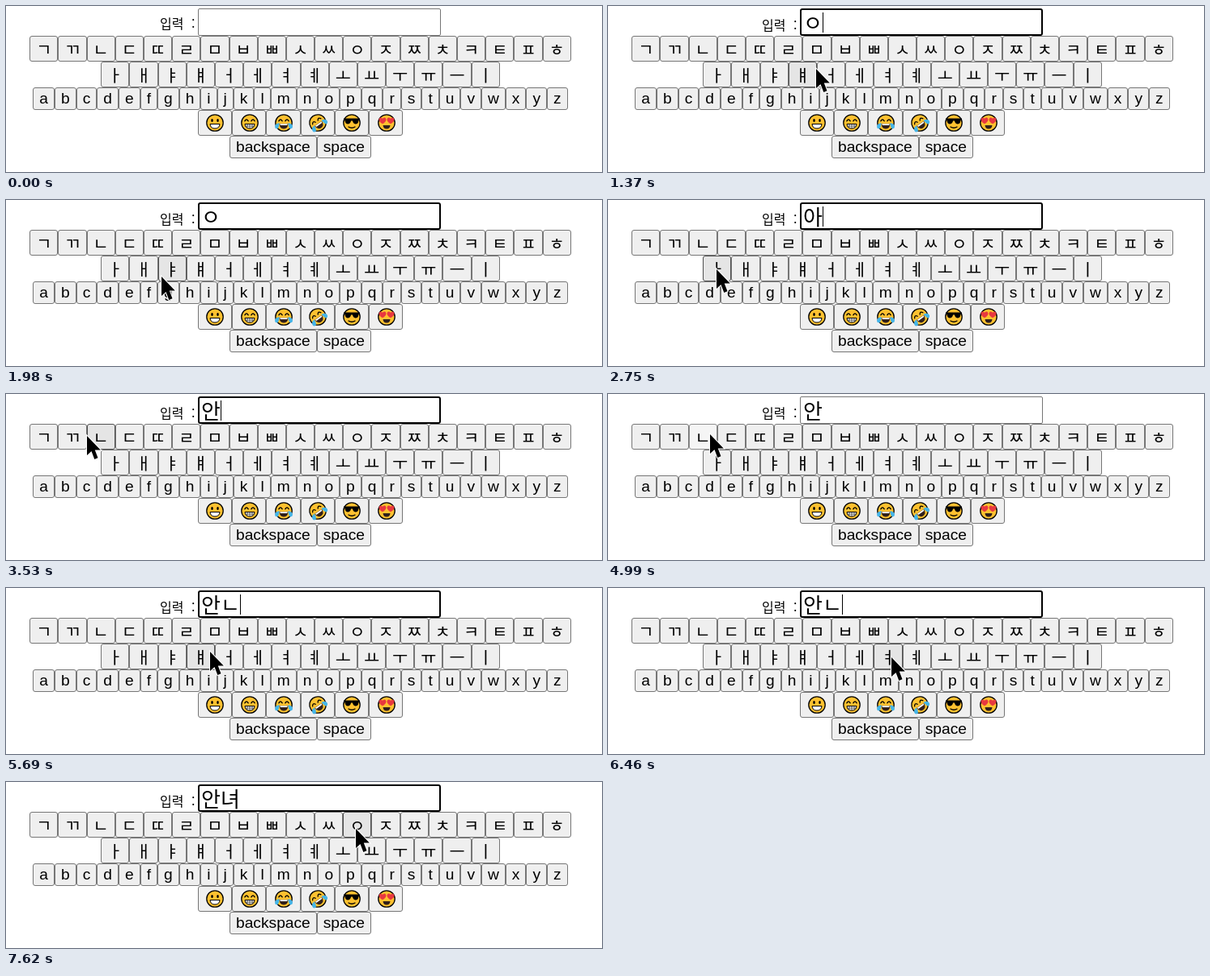
These frames come from a looping animation (736 px wide and 206 px high, 8000 ms). An HTML page:

```html
<!DOCTYPE html>
<html lang="ko">
<head>
<meta charset="utf-8">
<style>
  html, body { margin: 0; width: 736px; height: 206px; overflow: hidden; background: #fff; }
  body { position: relative; color: #000; font-family: "Noto Sans CJK KR", "Noto Sans CJK", sans-serif; font-weight: 300; }
  body > * { position: absolute; box-sizing: border-box; white-space: pre; }
  .row { left: 0; width: 727px; display: flex; justify-content: center; }
  .key {
    box-sizing: border-box; flex: none; height: 32px; padding: 0 7px; text-align: center;
    border: 1px solid #767676; border-radius: 3px; background: #efefef;
    font-size: 20.8px; line-height: 30px;
  }
  .jamo .key { width: 35.2px; padding: 0; }
  .latin .key { height: 28px; font: 19.2px/26px "Liberation Sans", Arial, sans-serif; }
  .emoji .key { width: 42.33px; padding: 3px 0 0 1px; line-height: 0; }
  .key.hover { background: #e5e5e5; border-color: #4f4f4f; }
  .key.active { background: #f5f5f5; border-color: #8d8d8d; }
  #label { left: 190px; font-size: 16px; line-height: 24px; word-spacing: 5px; }
  #field {
    left: 237px; top: 3px; width: 300px; height: 34px; border: 1px solid #767676; border-radius: 2px;
    font-size: 26px; line-height: 32px; padding-left: 3px;
  }
  #field.focus { border: 2px solid #000; border-radius: 3px; line-height: 30px; padding-left: 2px; }
  #caret { top: 8px; width: 1px; height: 25px; background: #000; }
  #cursor { left: 0; top: 0; overflow: visible; }
</style>
</head>
<body>
<div id="label">입력 :</div>
<div id="field"></div>
<div id="caret"></div>
<svg id="cursor" width="20" height="32">
  <path d="M0 0V24L5.5 19L9.3 29L13.5 27.2L9.8 17.5H16.8Z" stroke="#fff" stroke-width="2" paint-order="stroke"/>
</svg>
<script>
const $ = id => document.getElementById(id);
const label = $('label'), field = $('field'), caret = $('caret'), cursor = $('cursor');

const line = (d, width = 1.3) => `<path d="${d}" fill="none" stroke="#000" stroke-width="${width}" stroke-linecap="round"/>`;
const shape = (d, fill) => `<path d="${d}" fill="${fill}"/>`;
const arcEyes = line('M-6.2-2.2Q-4-6-1.8-2.2M1.8-2.2Q4-6 6.2-2.2');
const dotEyes = '<ellipse cx="-3.5" cy="-3" rx="1.3" ry="1.9"/><ellipse cx="3.5" cy="-3" rx="1.3" ry="1.9"/>';
const grin = '<path d="M-6 1.5H6Q5.5 7 0 7T-6 1.5Z" fill="#fff" stroke="#000"/>';
const teeth = line('M-5 4H5M-3 1.8V6M0 1.8V6.6M3 1.8V6', 0.6);
const laugh = shape('M-5.5 1H5.5Q5 7.5 0 7.5T-5.5 1Z', '#30201c') + shape('M-4.8 1.3H4.8L4.3 3H-4.3Z', '#fff');
const tears = shape('M-5.5 0Q-11 1-11 5Q-10.5 8-7.5 7Q-5.5 5-5.5 0ZM5.5 0Q11 1 11 5Q10.5 8 7.5 7Q5.5 5 5.5 0Z', '#45b5e8');
const shades = shape('M-10-5.5H10V-3.5L8.5-3Q8 1.5 4.5 1.5Q1.5 1 1-2.5H-1Q-1.5 1-4.5 1.5Q-8 1.5-8.5-3L-10-3.5Z', '#000');
const heart = x => shape(`M${x} 1.2C${x - 8}-3 ${x - 3.5}-9 ${x}-5.2C${x + 3.5}-9 ${x + 8}-3 ${x} 1.2Z`, '#e8383f');
const face = (features, tilt = 0) => `<svg width="24" height="24" viewBox="-12 -12 24 24">
  <g transform="rotate(${tilt})"><circle r="10.2" fill="#ffc130" stroke="#000" stroke-width="1.3"/>${features}</g></svg>`;

const faces = [
  face(dotEyes + grin),
  face(arcEyes + grin + teeth),
  face(arcEyes + laugh + tears),
  face(arcEyes + laugh + tears, -35),
  face(shades + line('M-4 5Q0 7.5 4 5')),
  face(heart(-5) + heart(5) + shape('M-4.5 3H4.5Q4 7.5 0 7.5T-4.5 3Z', '#30201c')),
];

function addRow(kind, top, labels) {
  const row = document.createElement('div');
  row.className = 'row ' + kind;
  row.style.top = top + 'px';
  row.innerHTML = labels.map(text => `<div class="key">${text}</div>`).join('');
  document.body.insertBefore(row, cursor);
}
addRow('jamo', 37, [...'ㄱㄲㄴㄷㄸㄹㅁㅂㅃㅅㅆㅇㅈㅉㅊㅋㅌㅍㅎ']);
addRow('jamo', 69, [...'ㅏㅐㅑㅒㅓㅔㅕㅖㅗㅛㅜㅠㅡㅣ']);
addRow('latin', 101, [...'abcdefghijklmnopqrstuvwxyz']);
addRow('emoji', 129, faces);
addRow('latin', 161, ['backspace', 'space']);

const keys = [...document.querySelectorAll('.key')].map(el => ({ el, box: el.getBoundingClientRect() }));

// Pointer path: time, x, y
const path = [
  [70, 569, 96], [220, 480, 62], [440, 432, 38], [1144, 432, 38], [1370, 257, 78],
  [1600, 225, 90], [1980, 192, 95], [2290, 134, 86], [2844, 134, 86], [3070, 103, 54],
  [3224, 103, 54], [3300, 100, 52], [3684, 100, 52], [3900, 88, 46], [4300, 150, 52],
  [4380, 150, 52], [4530, 132, 51], [4760, 126, 50], [5464, 126, 50], [5690, 252, 79],
  [6000, 345, 87], [6310, 372, 88], [6384, 372, 88], [6460, 350, 86], [7244, 350, 86],
  [7620, 432, 58], [8000, 432, 58],
];
// Clicks: press time, release time, resulting text
const clicks = [
  [740, 970, 'ㅇ'], [2520, 2750, '아'], [3300, 3530, '안'], [4990, 5220, '안ㄴ'], [6770, 7090, '안녀'],
];
const LOOP = 8000, STEP = 76, BLINK = 530;

function pointerAt(t) {
  const i = path.findIndex(([time]) => time > t);
  const [t0, x0, y0] = path[i - 1], [t1, x1, y1] = path[i];
  const stepped = Math.floor((t - t0 + 6) / STEP) * STEP;
  const p = Math.min(1, stepped / (t1 - t0));
  return [x0 + (x1 - x0) * p, y0 + (y1 - y0) * p];
}

function draw(t) {
  const visible = t >= path[0][0];
  const [x, y] = visible ? pointerAt(t) : [-99, -99];
  cursor.style.transform = `translate(${Math.round(x)}px, ${Math.round(y)}px)`;

  const pressed = clicks.some(([down, up]) => t >= down && t < up);
  for (const { el, box } of keys) {
    const over = x >= box.left && x < box.right && y >= box.top && y < box.bottom;
    el.className = 'key' + (over ? (pressed ? ' active' : ' hover') : '');
  }

  const last = clicks.filter(([, up]) => t >= up).pop();
  const text = last ? last[2] : '';
  const focused = Boolean(last) && !pressed;
  field.textContent = text;
  field.className = focused ? 'focus' : '';
  label.style.top = (last ? 11 : 9) + 'px';
  caret.style.left = 241 + 24 * text.length + 'px';
  caret.hidden = !focused || Math.floor((t - last[1]) / BLINK) % 2 === 1;
}

function tick() {
  draw(performance.now() % LOOP);
  requestAnimationFrame(tick);
}
tick();
</script>
</body>
</html>
```
